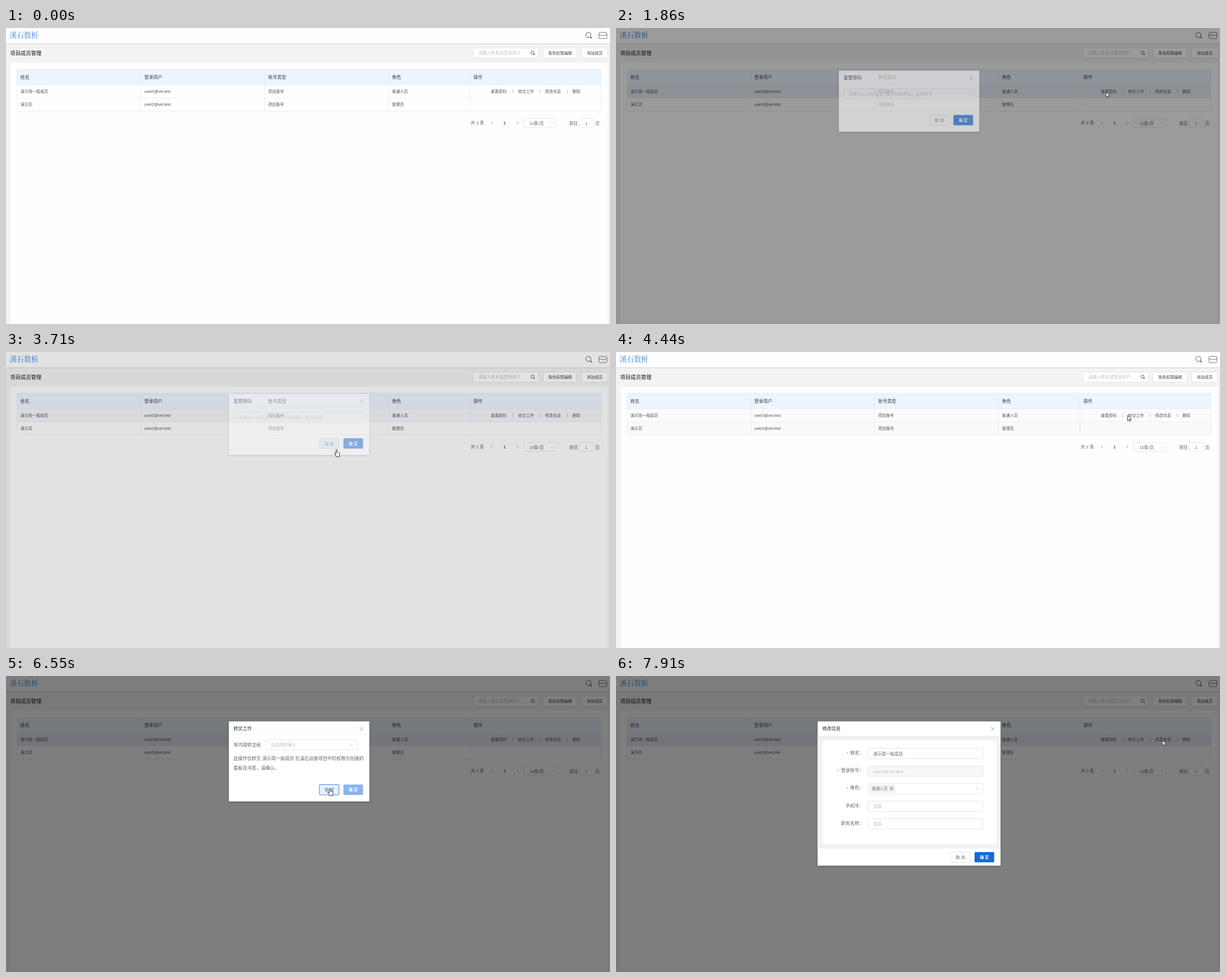
An HTML page that plays this animation: 1068 px wide and 525 px high, repeating every 8000 ms.

```html
<!DOCTYPE html>
<html lang="zh-CN">
<head>
<meta charset="utf-8">
<title>项目成员管理</title>
<style>
  html, body { margin: 0; height: 100%; overflow: hidden; background: #fefefe; }
  svg { display: block; width: 100vw; height: 100vh; }
  text { font-family: "Liberation Sans", "Noto Sans CJK SC", "Noto Sans CJK", sans-serif; white-space: pre; }
  .brand { font-family: "Noto Serif CJK SC", "Noto Serif", "Noto Sans CJK SC", serif; font-weight: 900; }
  .bold { font-weight: 700; }
  .semi { font-weight: 500; }
  .dialog > rect:first-child { filter: drop-shadow(0 1px 1.5px rgba(0, 0, 0, .35)); }
  .hover .cancel rect { fill: #e8f0fb; stroke: #b9d2f4; }
  .hover .cancel text { fill: #1668dc; }
  .press .cancel rect { stroke: #1668dc; }
</style>
</head>
<body>
<svg id="stage" viewBox="0 0 1068 525"></svg>
<script>
const LOOP = 8000;
const BLUE = '#1469dc', GREY = '#606266', PALE = '#bcc0c8', LINE = '#dcdfe6', GRID = '#e6eaf1';
const MEMBER = '演示用一般成员';

const rect = (x, y, w, h, fill, stroke = 'none', r = 0, extra = '') =>
  `<rect x="${x}" y="${y}" width="${w}" height="${h}" rx="${r}" fill="${fill}" stroke="${stroke}" stroke-width=".8" ${extra}/>`;
const path = (d, stroke, width = .8, fill = 'none') =>
  `<path d="${d}" stroke="${stroke}" stroke-width="${width}" fill="${fill}"/>`;
// cy is the visual middle of the line
const text = (x, cy, s, size, fill, anchor = 'start', cls = '') =>
  `<text x="${x}" y="${cy + size * .37}" font-size="${size}" fill="${fill}" text-anchor="${anchor}" class="${cls}">${s}</text>`;
const field = (x, y, w, h = 18, fill = '#fff') => rect(x, y, w, h, fill, LINE, 2);
const chevron = (x, y) => path(`M${x - 3} ${y - 1.5}l3 3l3-3`, PALE);
const lens = (x, y, r, color, w) =>
  `<circle cx="${x}" cy="${y}" r="${r}" fill="none" stroke="${color}" stroke-width="${w}"/>` +
  path(`M${x + r * .7} ${y + r * .7}l${r * .65} ${r * .65}`, color, w * 1.6);

function page() {
  const columns = [19.5, 238.5, 457.5, 676.5, 820.5, 1052];
  const cells = (row, cy, size, color) =>
    row.map((s, i) => text(columns[i] + 6, cy, s, size, color)).join('');
  const rowHover = (id, y) => rect(19.5, y, 1032.5, 23.3, '#f5f7fa', 'none', 0, `id="${id}" opacity="0"`);
  return rect(0, 0, 1068, 525, '#f3f3f3') + rect(0, 0, 1068, 27.5, '#fefefe') +
    rect(0, 27.5, 1068, 1.3, '#d9d9d9') + rect(8, 61.5, 1056, 464, '#fefefe') +
    text(6.5, 12.8, '溪石数析', 12.6, '#78ace4', 'start', 'brand') +
    lens(1029.8, 12.3, 4.5, '#555', 1) +
    rect(1048.5, 7.8, 14, 11, 'none', '#555', 2) + path('M1048.5 11.5Q1055.5 15.5 1062.5 11.5', '#555') +
    text(7.5, 44.3, '项目成员管理', 9.2, '#111', 'start', 'semi') +
    field(826, 35.5, 115.5) + text(835, 44.3, '请输入姓名或登录用户', 7.5, PALE) + lens(931, 43.8, 2.8, '#444', .8) +
    field(949.5, 35.5, 60) + text(979.7, 44.5, '角色权限编辑', 7, '#444', 'middle') +
    field(1018, 35.5, 46) + text(1041, 44.5, '添加成员', 7, '#444', 'middle') +
    rect(19.5, 73, 1032.5, 27.5, '#ecf4fe') +
    rowHover('row1', 100.7) + rect(19.5, 100.7, 1032.5, 23.3, '#e6ebf7', 'none', 0, 'id="tint" opacity="0"') +
    rowHover('row2', 124.2) +
    path('M19.5 73H1052M19.5 100.5H1052M19.5 124H1052M19.5 147.3H1052' +
      columns.map(x => `M${x} 73V147.3`).join(''), GRID) +
    cells(['姓名', '登录用户', '账号类型', '角色', '操作'], 86.8, 8, '#3c3f45') +
    cells([MEMBER, 'user3@vel.test', '项目账号', '普通人员'], 112, 7, '#505359') +
    cells(['演示员', 'user2@vel.test', '项目账号', '管理员'], 135, 7, '#505359') +
    ['重置密码', '转交工作', '修改信息', '删除'].map((s, i) => text(857.2 + i * 48.2, 112, s, 7, '#55585e')).join('') +
    [896.3, 944.5, 992.7].map(x => path(`M${x} 109V115.5`, '#a0a3a8', .7)).join('') +
    text(821.8, 168, '共 2 条', 7.6, GREY) +
    path('M860.5 165.3l-2.7 2.7l2.7 2.7', '#8a8d93') + path('M903 165.3l2.7 2.7l-2.7 2.7', '#8a8d93') +
    text(881.7, 168, '1', 7.5, BLUE, 'middle', 'bold') +
    field(915.5, 160.5, 57.5, 15.7) + text(925.5, 168.8, '10条/页', 7.5, GREY) +
    path('M963.5 168l2.2 2.2l2.2-2.2', PALE) +
    text(996, 168.8, '前往', 7.5, GREY) + field(1013.5, 160.5, 26, 15.7) +
    text(1026.2, 168.8, '1', 7.5, GREY, 'middle') + text(1042, 168.8, '页', 7.5, GREY);
}

const frame = (x, w, h, title, cls) =>
  rect(x, 80.5, w, h, '#fff', 'none', 1) + text(x + 8.2, 93.2, title, 8.1, '#25282d', 'start', cls) +
  path(`M${x + w - 17.2} 90.6l6.6 6.6m0-6.6l-6.6 6.6`, '#909399', .8);
const buttons = (x, y, okFill = BLUE) =>
  `<g class="cancel">${rect(x, y, 34.7, 18.3, '#fff', LINE, 1.5)}${text(x + 17.4, y + 9.3, '取 消', 7, GREY, 'middle')}</g>` +
  rect(x + 42.3, y, 34.7, 18.3, okFill, 'none', 1.5) + text(x + 59.7, y + 9.3, '确 定', 7, '#fff', 'middle', 'bold');

const resetDialog = () =>
  frame(394, 248.5, 108.5, '重置密码', 'semi') + path('M394 103.3H642.5', '#f0f0f0') +
  field(402.5, 113, 232) + text(411.3, 122, '请输入6-18位英文+数字的新密码，支持符号', 7.6, PALE) +
  buttons(554.3, 159.3);

const transferDialog = () =>
  frame(394, 248.5, 142, '转交工作', '') + path('M394 103.3H642.5', '#f0f0f0') +
  text(402.3, 121.8, '将内容转交给', 8.1, GREY) + field(459.3, 113, 161.7) +
  text(468, 122, '请选择转接人', 7.5, PALE) + chevron(611, 122) +
  text(402.3, 145.8, `此操作仅转交 ${MEMBER} 在溪石运维项目中的权限与创建的`, 8.07, GREY) +
  text(402.3, 163, '看板及书签，请确认。', 8.07, GREY) +
  buttons(554.3, 192.6, '#89b4ee');

function editDialog() {
  const rows = [['姓名', MEMBER, 7.5, GREY], ['登录账号', 'user3@vel.test', 8, PALE],
    ['角色', '', 7, GREY], ['手机号', '选填', 7.5, PALE], ['职务名称', '选填', 7.5, PALE]];
  return frame(356.5, 323.5, 256, '修改信息', 'semi') +
    rect(356.5, 106, 323.5, 200.3, '#f2f2f3') + rect(365, 114.3, 307.8, 184.2, '#fff', 'none', 2) +
    rows.map(([label, value, size, color], i) => {
      const y = 128.3 + i * 31.2;
      return text(438, y + 7.8, label + '：', 8, GREY, 'end') +
        (i < 3 ? text(433 - 8 * (label.length + 1), y + 8.3, '*', 8, '#ee6a4c', 'middle') : '') +
        field(445.5, y, 203.3, 18.5, i === 1 ? '#f5f7fa' : '#fff') + text(454.8, y + 9.5, value, size, color);
    }).join('') +
    rect(449, 193.7, 44, 12.3, '#f0f2f5', '#e4e7ed', 1.5) + text(452.2, 199.8, '普通人员', 7, '#74777d') +
    '<circle cx="487.3" cy="199.6" r="3.1" fill="#aeb2ba"/>' + path('M486.2 198.5l2.2 2.2m0-2.2l-2.2 2.2', '#fff', .6) +
    chevron(638.7, 200) + buttons(591.7, 312.3);
}

const modals = [
  { open: 1765, close: 3615, draw: resetDialog },
  { open: 4815, close: 6645, draw: transferDialog },
  { open: 7610, close: Infinity, draw: editDialog },
];
// start, end, x, y, sideways bend of the path
const moves = [
  [20, 830, 890, 130, 0], [840, 1360, 866.5, 113, 0], [2290, 3000, 584.5, 173, 30],
  [3920, 4470, 907.3, 111.5, 10], [5740, 6510, 572.7, 199.5, 0], [6930, 7480, 966, 114, 8],
];
const row1Hover = [[840, 3920], [4350, 6940], [7390, LOOP]];
const row2Hover = [[650, 840], [4200, 4350], [7250, 7390]];
const cancelHover = [[2840, 3920], [6360, 6930]];
const cancelPress = [[3520, 3615], [6550, 6645]];

const stage = document.getElementById('stage');
stage.innerHTML = page() + rect(0, 0, 1068, 525, '#000', 'none', 0, 'id="shade" opacity="0"') +
  modals.map((m, i) => `<g class="dialog" id="dialog${i}">${m.draw()}</g>`).join('') +
  '<g id="pointer"><g id="arrow">' +
  path('M0 0V9.6L2.2 7.6L3.7 10.9L5.2 10.2L3.8 7.1H6.7Z', '#222831', .9, '#fff') + '</g><g id="hand">' +
  path('M-1 1Q-1 0 0 0T1 1V4.6L4.6 5.4Q5.8 5.8 5.6 7.2L4.8 11V12.8H-1V11L-3.8 7.6Q-4 6.2-2.6 6.5L-1 8Z', '#222831', .9, '#fff') +
  '</g></g>';
const get = id => document.getElementById(id);
const set = (id, name, value) => get(id).setAttribute(name, value);

const clamp = v => Math.min(1, Math.max(0, v));
const inside = (spans, t) => spans.some(([a, b]) => t >= a && t < b);
const fade = (spans, t) => Math.max(...spans.map(([a, b]) => clamp((t - a) / 200) * (1 - clamp((t - b) / 200))));

// CSS "ease": cubic-bezier(.25, .1, .25, 1)
function ease(x) {
  if (x <= 0 || x >= 1) return clamp(x);
  let lo = 0, hi = 1, u;
  for (let i = 0; i < 16; i++) {
    u = (lo + hi) / 2;
    if (.75 * u * (1 - u) + u ** 3 < x) lo = u; else hi = u;
  }
  return .3 * u * (1 - u) ** 2 + 3 * u * u * (1 - u) + u ** 3;
}
const shown = (m, t, duration) => ease((t - m.open) / duration) * (1 - ease((t - m.close) / duration));

function pointerAt(t) {
  let x = 1037, y = 526;
  for (const [start, end, toX, toY, bend] of moves) {
    if (t <= start) break;
    const p = clamp((t - start) / (end - start)), s = p * p * (3 - 2 * p);
    x += (toX - x) * s;
    y += (toY - y) * s + bend * 4 * s * (1 - s);
  }
  return [x, y];
}

function render(t) {
  let shade = 0;
  modals.forEach((m, i) => {
    const v = shown(m, t, 300);
    shade = Math.max(shade, shown(m, t, 200));
    set('dialog' + i, 'opacity', v);
    set('dialog' + i, 'transform', `translate(0 ${-11.3 * (1 - v)})`);
    set('dialog' + i, 'visibility', v ? 'visible' : 'hidden');
  });
  set('shade', 'opacity', shade * .5);
  set('tint', 'opacity', shade);
  set('row1', 'opacity', fade(row1Hover, t));
  set('row2', 'opacity', fade(row2Hover, t));
  const hand = inside(cancelHover, t);
  stage.setAttribute('class', (hand ? 'hover ' : '') + (inside(cancelPress, t) ? 'press' : ''));
  set('hand', 'visibility', hand ? 'visible' : 'hidden');
  set('arrow', 'visibility', hand ? 'hidden' : 'visible');
  set('pointer', 'transform', `translate(${pointerAt(t)})`);
}

const begin = performance.now();
(function tick() {
  render((performance.now() - begin) % LOOP);
  requestAnimationFrame(tick);
})();
</script>
</body>
</html>
```
